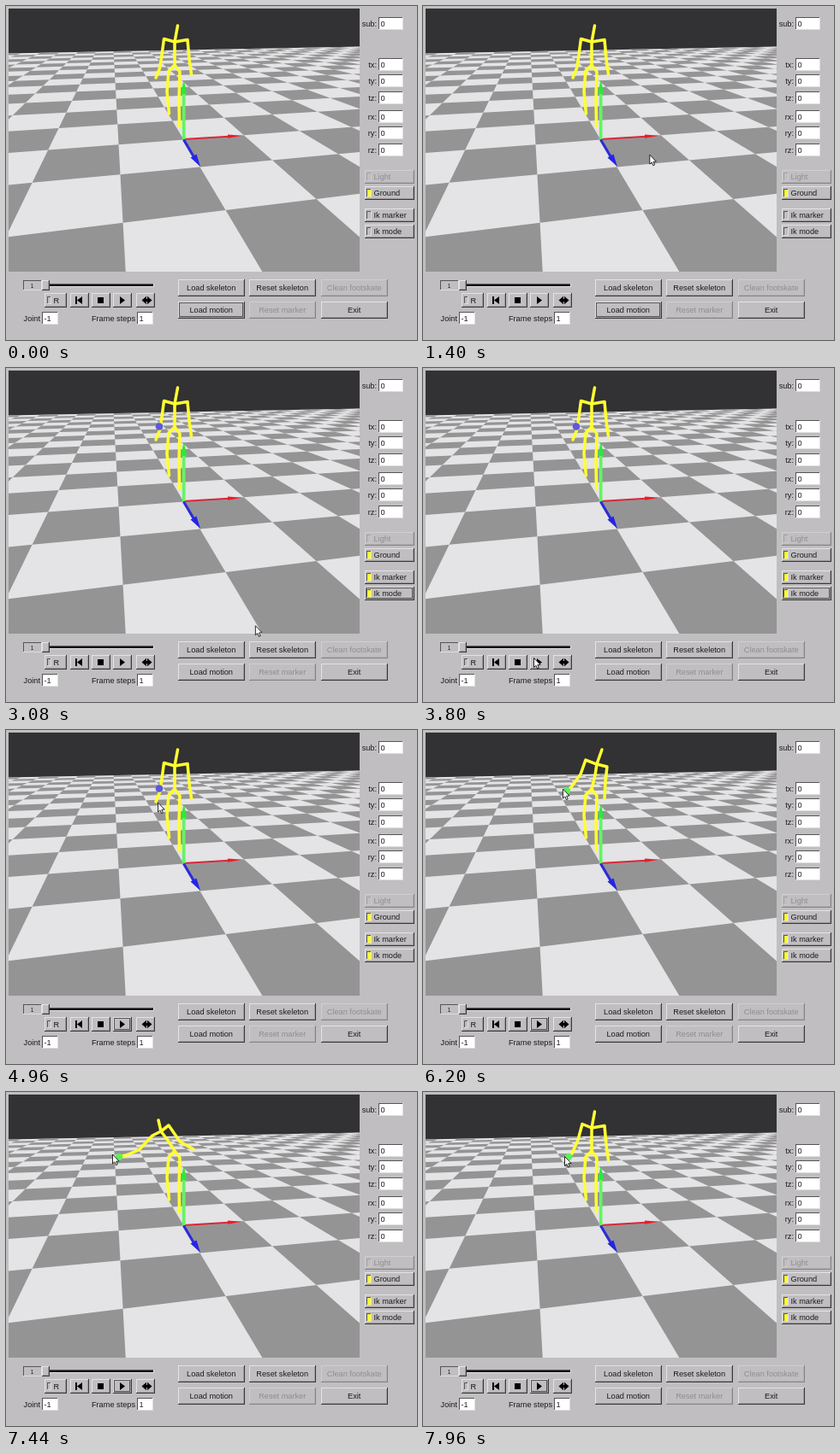
Animation of 480x391 px, one loop 8000 ms. Source, as an HTML page with a canvas:

```html
<!DOCTYPE html>
<html>
<head>
<meta charset="utf-8">
<style>
html, body { margin: 0; width: 100%; height: 100%; overflow: hidden; background: #c0bec0; }
canvas { display: block; }
</style>
</head>
<body>
<canvas id="stage" width="480" height="391"></canvas>
<script>
const LOOP = 8000;
const g = document.getElementById('stage').getContext('2d');
const GRAY = '#c0bec0', DIM = '#8f8d8f', INK = '#1a1a1a', YELLOW = '#ffff32';

function rect(x, y, w, h, fill) {
  g.fillStyle = fill;
  g.fillRect(x, y, w, h);
}

function poly(points, fill) {
  g.beginPath();
  points.forEach(p => g.lineTo(...p));
  g.closePath();
  g.fillStyle = fill;
  g.fill();
}

function line(points, color, width) {
  g.beginPath();
  points.forEach(p => g.lineTo(...p));
  g.strokeStyle = color;
  g.lineWidth = width;
  g.stroke();
}

function text(s, x, y, align = 'left', color = INK, size = 9.2) {
  g.font = size + 'px "Liberation Sans", Arial, sans-serif';
  g.textAlign = align;
  g.fillStyle = color;
  g.fillText(s, x, y);
}

// ---- Ground: camera orbiting the origin, 45 degree view ----
const YAW = 0.209, PITCH = 0.365, DIST = 4.96, FOCAL = 370, CX = 207.5, CY = 156.5, EDGE = 15;

function depth(x, z) {
  return DIST - (z * Math.cos(YAW) - x * Math.sin(YAW)) * Math.cos(PITCH);
}

function project(x, z) {
  const right = x * Math.cos(YAW) + z * Math.sin(YAW);
  const near = z * Math.cos(YAW) - x * Math.sin(YAW);
  const k = FOCAL / depth(x, z);
  return [CX + right * k, CY + near * Math.sin(PITCH) * k];
}

function drawGround() {
  rect(3, 3, 410, 308, '#323133');
  poly([project(-8, -EDGE), project(18, -EDGE), [420, 320], [-5, 320]], '#e4e3e5');
  for (let z = -EDGE; z < 4; z++) {
    for (let x = -EDGE; x < 18; x++) {
      const corners = [[x, z], [x + 1, z], [x + 1, z + 1], [x, z + 1]];
      if ((x + z) % 2 || corners.some(c => depth(...c) < 0.4)) continue;
      poly(corners.map(c => project(...c)), '#959495');
    }
  }
}

function drawAxes() {
  line([[207, 156], [264, 152.6]], '#d8283a', 2);
  poly([[259, 150.5], [276, 151.8], [259, 154.7]], '#ee1c28');
  line([[207.7, 156], [207.7, 100]], '#62f562', 3.6);
  poly([[204, 103], [207.7, 86.5], [211.4, 103]], '#2ce83a');
  line([[207.5, 156.5], [219, 176]], '#2c2cd8', 3.2);
  poly([[215.5, 177.5], [222.5, 173.5], [227, 188]], '#2424e6');
}

// ---- Skeleton poses: head, neck, shoulders, arms ----
const REST = {
  head: [200.5, 23], neck: [197, 42], ls: [184.5, 38.5], le: [181.5, 61], lw: [179.5, 73], lh: [175, 84],
  rs: [212, 39.5], re: [214, 62], rh: [216.5, 80], spine: [197, 55], mark: [179, 68.5]
};
const LEAN = {
  head: [209, 23], neck: [203, 40], ls: [190, 35], le: [184, 52], lw: [173, 67], lh: [168, 71],
  rs: [215, 43], re: [213, 61], rh: [212, 80], spine: [201, 53], mark: [168, 71]
};
const REACH = {
  head: [178, 33], neck: [181, 46], ls: [171, 51], le: [155, 68], lw: [140, 74], lh: [133, 76],
  rs: [190, 39], re: [203, 58], rh: [219, 67], spine: [190, 58], mark: [132, 76]
};
const BACK = {
  ...REST, ls: [186, 37.5], le: [181, 56], lw: [174, 72], lh: [170, 76], mark: [170, 76]
};

const mix = (a, b, k) => a.map((v, i) => v + (b[i] - v) * k);

function mixPose(a, b, k) {
  const pose = {};
  for (const j in a) pose[j] = mix(a[j], b[j], k);
  return pose;
}

const HALF = mixPose(LEAN, REACH, 0.4);
const POSES = [[0, REST], [5860, REST], [6200, LEAN], [6400, HALF], [6700, HALF],
  [7440, REACH], [7540, REACH], [7960, BACK], [LOOP, BACK]];
const PATH = [[880, [214, 312]], [1400, [264.5, 174]], [1700, [352, 212]], [2020, [432, 242]],
  [2200, [433, 243]], [2400, [437.5, 258]], [2760, [439, 260]], [3360, [163, 338]],
  [3640, [129.5, 339.5]], [4200, [129.5, 339.5]], [5000, [180, 72]], [5840, [175, 67]],
  [6200, [163.5, 69]], [6400, [147, 72]], [6700, [147, 72]], [7440, [124.5, 73]],
  [7540, [124.5, 73]], [7960, [165.5, 75.5]], [LOOP, [165.5, 75.5]]];

function at(keys, t, blend) {
  const i = keys.findIndex(k => k[0] > t);
  const [t0, a] = keys[i - 1], [t1, b] = keys[i];
  return blend(a, b, (t - t0) / (t1 - t0));
}

function drawSkeleton(t) {
  const p = at(POSES, t, mixPose), hip = [197, 69];
  g.lineCap = g.lineJoin = 'round';
  [
    [hip, [190, 76], [188, 100], [190.5, 126]],
    [hip, [203, 77], [202, 109], [202.5, 141]],
    [hip, p.spine, p.neck, p.head],
    [p.lh, p.lw, p.le, p.ls, p.neck, p.rs, p.re, p.rh]
  ].forEach(bone => line(bone, YELLOW, 3.5));
  g.lineCap = 'butt';
  g.lineJoin = 'miter';
  if (t < 2120) return;
  g.beginPath();
  g.arc(...p.mark, 4.3, 0, 7);
  g.fillStyle = t < 5800 ? '#5c58e0' : '#5af05a';
  g.fill();
}

// ---- Control panel ----
function box(x, y, w, h, focus, off) {
  rect(x, y, w, h, off ? '#858385' : '#3a3a3a');
  rect(x, y, w - 1, h - 1, off ? '#d0ced0' : '#e4e4e4');
  rect(x + 1, y + 1, w - 2, h - 2, off ? '#b0aeb0' : '#9c9a9c');
  rect(x + 1, y + 1, w - 3, h - 3, GRAY);
  if (focus) {
    g.strokeStyle = '#555';
    g.lineWidth = 1;
    g.strokeRect(x + 1.5, y + 1.5, w - 4, h - 4);
  }
}

function sunken(x, y, w, h, fill, off) {
  rect(x, y, w, h, off ? '#cac8ca' : '#dedede');
  rect(x, y, w - 1, h - 1, off ? '#a3a1a3' : '#555');
  rect(x + 1, y + 1, w - 2, h - 2, fill);
}

function input(label, x, y, w, value) {
  text(label, x - 2, y + 10.5, 'right');
  sunken(x, y, w, 15, '#fff');
  text(value, x + 2.5, y + 11);
}

function button(label, x, y, focus, off) {
  box(x, y, 78, 20, focus, off);
  text(label, x + 38.7, y + 13.4, 'center', off ? DIM : INK);
}

function toggle(label, y, on, focus, off) {
  box(419, y, 58, 16, focus, off);
  sunken(421, y + 3, 6, 10, on ? YELLOW : GRAY, off);
  text(label, 429.5, y + 11.2, 'left', off ? DIM : INK);
}

function drawPlayer(focus) {
  sunken(20, 321, 22, 12, GRAY);
  text('1', 30.5, 329.5, 'center', INK, 6.5);
  sunken(42, 325, 131, 4, '#111');
  box(42, 321, 9, 12);

  box(45, 336, 26, 17);
  sunken(48, 340, 5, 9, GRAY);
  text('R', 55.5, 348);
  [75, 100, 125, 152].forEach(x => box(x, 336, 22, 17, focus && x === 125));
  rect(81, 340, 2, 9, '#000');
  poly([[83, 344.5], [89, 340], [89, 349]], '#000');
  rect(107, 341, 7, 7, '#000');
  poly([[133, 340], [139, 344.5], [133, 349]], '#000');
  poly([[158.5, 344.5], [164, 339.7], [164, 349.3]], '#000');
  poly([[170.5, 344.5], [165, 339.7], [165, 349.3]], '#000');
  rect(163, 343, 3, 3, '#000');

  input('Joint', 42, 358, 19, '-1');
  input('Frame steps', 153, 358, 19, '1');
}

function drawPanel(t) {
  const focus = t < 2120 ? 'motion' : t < 2640 ? 'marker' : t < 4000 ? 'mode' : 'play';
  input('sub:', 435, 13, 29, '0');
  ['tx:', 'ty:', 'tz:', 'rx:', 'ry:', 'rz:'].forEach((s, i) =>
    input(s, 435, 61 + i * 19.5 + (i > 2 ? 2.5 : 0) | 0, 29, '0'));
  toggle('Light', 192, false, false, true);
  toggle('Ground', 211, true);
  toggle('Ik marker', 237, t >= 2120, focus === 'marker');
  toggle('Ik mode', 256, t >= 2640, focus === 'mode');
  button('Load skeleton', 201, 320);
  button('Reset skeleton', 284, 320);
  button('Clean footskate', 368, 320, false, true);
  button('Load motion', 201, 346, focus === 'motion');
  button('Reset marker', 284, 346, false, true);
  button('Exit', 368, 346);
  drawPlayer(focus === 'play');
}

function drawCursor(t) {
  if (t < PATH[0][0]) return;
  const [x, y] = at(PATH, t, mix);
  const shape = [[0, 0], [0, 11], [2.4, 8.8], [4, 12.6], [5.8, 11.8], [4.3, 8.2], [7.6, 8]]
    .map(([a, b]) => [x + a, y + b]);
  poly(shape, '#fff');
  line([...shape, shape[0]], '#111', 0.9);
}

function draw(t) {
  rect(0, 0, 480, 391, GRAY);
  g.save();
  g.beginPath();
  g.rect(3, 3, 410, 308);
  g.clip();
  drawGround();
  drawAxes();
  drawSkeleton(t);
  g.restore();
  drawPanel(t);
  drawCursor(t);
}

const start = performance.now();
function tick() {
  draw((performance.now() - start) % LOOP);
  requestAnimationFrame(tick);
}
tick();
</script>
</body>
</html>
```
